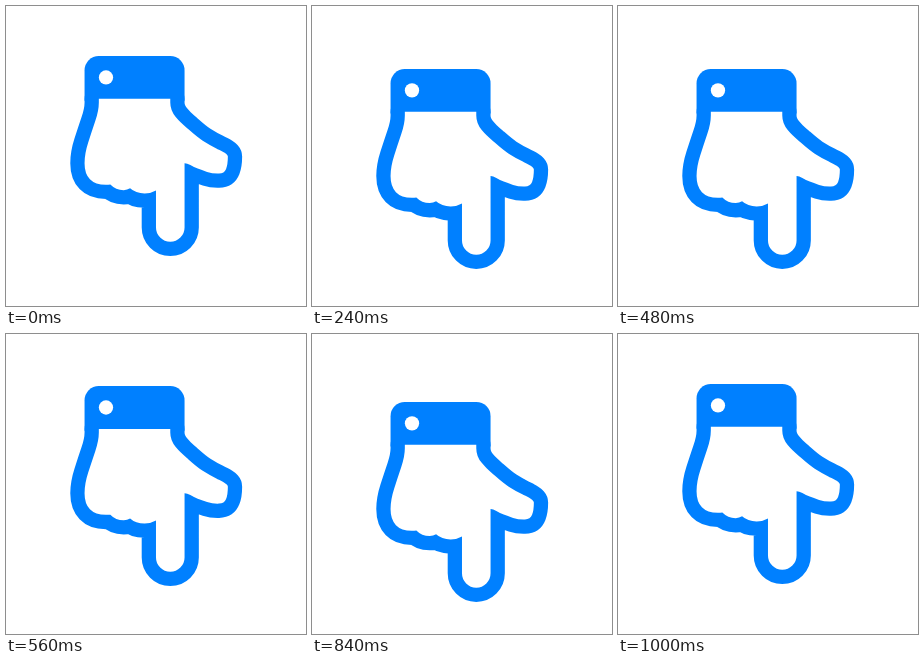
An HTML page with a canvas for the animation above (1200 ms loop, 300 by 300 pixels).

```html
<!DOCTYPE html>
<html lang="en">
<head>
<meta charset="utf-8">
<title>Pointing hand</title>
<style>
  html, body { margin: 0; width: 100%; height: 100%; overflow: hidden; background: #fff; }
  canvas { display: block; width: 300px; height: 300px; }
</style>
</head>
<body>
<canvas id="stage" width="300" height="300"></canvas>
<script>
const ctx = document.getElementById('stage').getContext('2d');
const BLUE = '#0080ff';
const LOOP = 1200, STEP = 40, DROP = 20;
const SCALE = 200 / 1792;

// Inner contour of the hand, in a mirrored 1536 x 1792 space
const hand = new Path2D(
  // fist side up to the cuff
  'M1408 960q0-84-32-183t-64-194-32-167v-32h-640v32' +
  // top of the thumb
  'q0 35-12 67.5t-37 62.5-46 50-54 49q-9 8-14 12-81 72-128 102-68 43-126 71' +
  '-4 2-19 9.5t-26.5 13.5-25 14.5-21 17-7.5 16.5' +
  // tip and underside of the thumb
  'q0 71 16 111t64 41q56 2 106-14t84-30 66-32 52-17' +
  // index finger
  'V1536a128 128 0 0 0 256 0V1205' +
  // knuckles
  'q46 27 102 27 80 0 130-46 26 16 57 16 72 0 120-50 16 2 40 2 95 0 143-50t48-144z'
);

const cuff = new Path2D();
cuff.roundRect(512, 0, 896, 400, [128, 128, 0, 0]);

const button = new Path2D();
button.arc(1216, 192, 64, 0, Math.PI * 2);

// [time, position], eased between neighbours
const keys = [[0, 0], [400, 1], [600, 0], [800, 1], [1000, 0], [LOOP, 0]];
const ease = u => u * u * (3 - 2 * u);

function offset(t) {
  const i = keys.findIndex(k => t < k[0]);
  const [t0, a] = keys[i - 1], [t1, b] = keys[i];
  return DROP * (a + (b - a) * ease((t - t0) / (t1 - t0)));
}

function draw(now) {
  const t = Math.floor((now % LOOP) / STEP) * STEP;
  ctx.setTransform(1, 0, 0, 1, 0, 0);
  ctx.fillStyle = '#fff';
  ctx.fillRect(0, 0, 300, 300);

  ctx.setTransform(-SCALE, 0, 0, SCALE, 235.7, 50 + offset(t));
  ctx.lineWidth = 256;
  ctx.lineJoin = 'round';
  ctx.strokeStyle = ctx.fillStyle = BLUE;
  ctx.stroke(hand);
  ctx.fill(cuff);
  ctx.fillStyle = '#fff';
  ctx.fill(hand);
  ctx.fill(button);
}

const start = performance.now();
function tick() {
  draw(performance.now() - start);
  requestAnimationFrame(tick);
}
tick();
</script>
</body>
</html>
```
